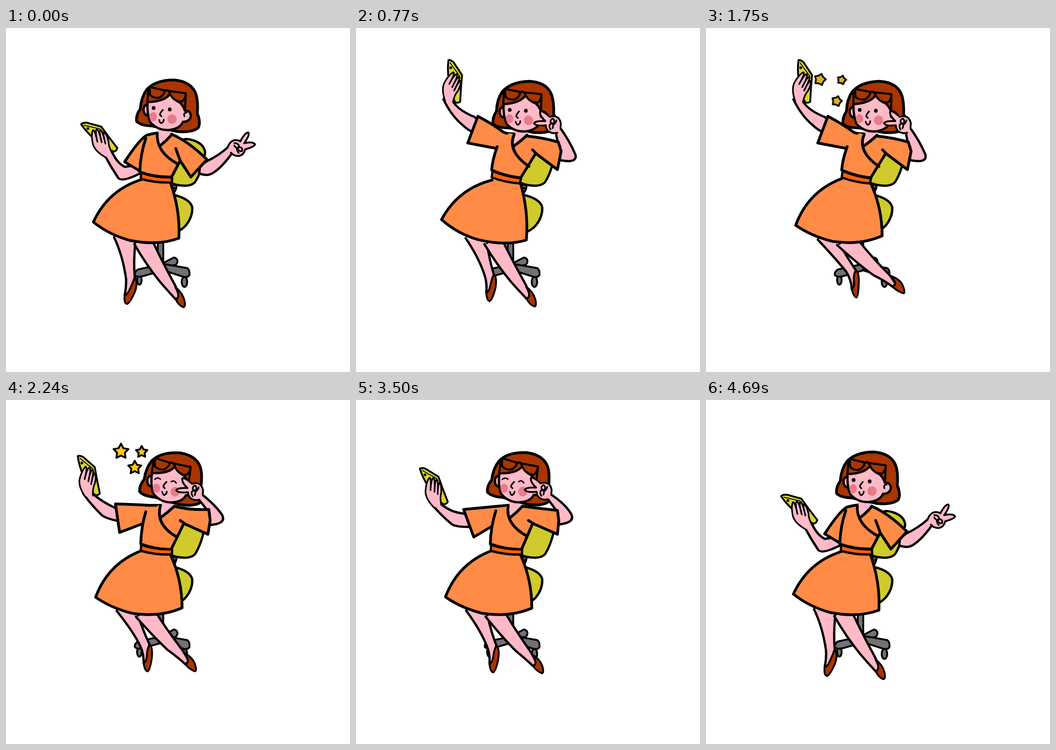
An HTML page with a canvas for the animation above (4760 ms loop, 748 by 748 pixels).

```html
<!DOCTYPE html>
<html lang="en">
<head>
<meta charset="utf-8">
<title>Selfie</title>
<style>
html, body { margin: 0; height: 100%; overflow: hidden; background: #fff; }
canvas { display: block; }
</style>
</head>
<body>
<canvas id="stage" width="748" height="748"></canvas>
<script>
const ctx = document.getElementById('stage').getContext('2d');
const LOOP = 4760, STEP = 70;
const SKIN = '#ffb9c7', HAIR = '#ab3500', DRESS = '#ff8b47', BELT = '#ff5f05',
      LIME = '#cfcb2c', GRAY = '#747074', BLUSH = '#e77c8b';

// Each list holds one shape in successive poses: lowered, raised, posing, lowering, lowered.
const cycle = list => [...list, list[0]];
const sleeveL = cycle([
  'M332 228Q316 230 306 233Q290 242 258 291L291 311L297 285',
  'M344 230Q326 230 320 226Q296 208 265 192L243 250L306 262',
  'M336 229Q320 229 310 229Q276 227 238 226L247 288L297 269',
  'M330 229Q318 230 308 231Q275 234 234 238L256 298L295 275']);
const armL = cycle([
  'M214 276Q228 302 244 326Q252 336 292 316L284 298L258 302Q240 292 230 268',
  'M190 155Q208 192 233 212Q241 220 256 228L270 203L257 193Q224 180 211 160',
  'M168 203Q180 222 206 248Q213 257 244 263L245 238L236 234Q210 222 190 205',
  'M167 229Q184 250 207 269Q214 276 246 276L244 249L234 247Q206 244 186 227']);
const phoneAt = cycle(['202 237 -26', '212 116 15', '178.5 164 0', '168 187 -9.5']);
const torso = cycle([
  'M304 240Q292 275 291 313Q325 325 360 324L378 290',
  'M307 258Q297 285 295 309Q325 322 358 326L390 274',
  'M304 243Q294 275 293 313Q325 325 359 325L387 268',
  'M304 241Q293 275 292 313Q325 325 360 325L384 269']);
const neck = cycle([
  'M331 215L331 232Q331 248 335 255L361 231L357 215Z',
  'M345 215L344 232Q340 250 342 257L371 233L368 215Z',
  'M339 215L337 232Q332 248 336 255L365 231L360 215Z',
  'M332 215L332 232Q331 248 335 255L362 231L358 215Z']);
const collar = cycle([
  'M329 229Q326 270 374 296M335 256Q350 244 361 231',
  'M344 231Q328 268 376 301M341 258Q356 248 372 233',
  'M336 229Q324 270 370 297M336 256Q352 244 366 231',
  'M331 229Q324 270 372 296M335 256Q350 244 362 231']);
const sleeveR = cycle([
  'M369 262L379 289L402 324L437 286L436 285Q396 246 360 231',
  'M384 265L394 275L438 308L446 268L440 248Q404 238 372 235',
  'M379 262L390 270L439 292L444 262L441 238Q400 240 366 231',
  'M375 262L388 270L438 292L441 262L438 240Q400 236 362 231']);
const beltLow = 'M294 315Q325 326 361 325L361 336Q325 337 293 328Z';
const belt = [beltLow, 'M297 311Q325 323 359 327L356 338Q325 336 295 325Z', beltLow, beltLow, beltLow];
const headAt = cycle(['0 0 0', '14 3.5 -2', '7 0 4', '2 0 3']);

// The waving arm passes through an upright pose on its way in and out.
const out = 'M491 273Q470 302 452 314Q438 324 420 316L422 300L436 290Q462 278 484 258';
const upright = 'M481 255Q470 288 455 310Q442 324 420 314L422 300L436 288Q458 268 468 248';
const armR = [out, upright,
  'M441 213Q464 244 477 275Q482 294 447 288L436 282L444 258Q436 245 435 227',
  'M427 206Q456 229 470 250Q480 270 440 272L436 262L443 247Q432 232 418 215',
  'M425 206Q456 227 468 248Q478 268 436 271L434 262L440 247Q430 232 416 214',
  upright, out];
const signAt = ['502 261 38', '485 240 0', '429 210 -85', '412 199 -85', '409 198 -85', '485 240 0', '502 261 38'];

const skirt = [
  'M296 329Q222 352 190 422Q225 450 270 462Q330 474 376 457Q379 395 357 335',
  'M296 327Q222 355 195 429Q230 453 275 464Q335 473 383 452Q383 390 357 335'];
const legL = [
  'M235 455Q254 495 261 545Q262 560 258 582L272 575Q274 556 280 543Q277 510 281 468',
  'M243 460Q285 505 305 530Q316 548 317 568L322 563Q320 540 326 527Q308 500 290 470'];
const shoeL = [
  'M281 543Q287 552 281 572Q270 598 263 600Q256 598 258 582Q264 580 270 566Q276 552 281 543Z',
  'M326 527Q334 532 332 560Q331 584 327 586Q321 584 317 568Q323 565 322 550Q320 535 326 527Z'];
const legR = [
  'M279 470Q305 515 335 552Q352 572 369 590L378 585Q372 570 368 560Q338 505 320 466',
  'M285 472Q335 517 365 538Q390 550 406 563L412 556Q406 546 400 538Q362 500 335 466'];
const shoeR = [
  'M368 563Q384 576 388 592Q391 606 386 607Q376 604 369 590Q376 588 374 576Q371 568 368 563Z',
  'M399 538Q420 545 427 558Q434 574 430 577Q418 574 406 563Q414 558 410 550Q405 544 399 538Z'];

// Timelines: [ms, value]
const bodyKeys = [[0, 0], [650, 1], [1750, 1], [2240, 2], [2700, 2.5], [3360, 2.5], [3500, 3], [4130, 3.95], [4480, 4]];
const waveKeys = [[0, 0], [650, 2], [1750, 2], [2240, 3], [2700, 3.5], [3360, 3.5], [3500, 4], [3620, 4.03], [4130, 5], [4620, 6]];
const legLKeys = [[0, 0], [770, .43], [1750, 1], [2240, .7], [2700, .57], [3430, .57], [3500, .55], [4130, .14], [4620, 0]];
const legRKeys = [[0, 0], [770, .05], [1750, 1], [2240, .57], [2700, .45], [3430, .45], [3500, .43], [4130, .02], [4480, 0]];
const skirtKeys = [[0, 0], [770, -.8], [1750, 1], [3500, .9], [4130, 0]];
const starKeys = [[1610, 0], [1750, .45], [2030, 1], [2520, 1], [2800, 0]];

function track(keys, t) {
  const i = keys.findIndex(k => k[0] > t);
  if (i < 0) return keys[keys.length - 1][1];
  if (!i) return keys[0][1];
  const [t0, a] = keys[i - 1], [t1, b] = keys[i], u = (t - t0) / (t1 - t0);
  return a + (b - a) * u * u * (3 - 2 * u);
}

function mix(poses, x) {
  const i = Math.max(0, Math.min(Math.floor(x), poses.length - 2));
  const next = poses[i + 1].match(/-?[\d.]+/g);
  let n = 0;
  return poses[i].replace(/-?[\d.]+/g, v => (+v + (next[n++] - v) * (x - i)).toFixed(2));
}

function draw(path, fill, width = 5) {
  const p = new Path2D(path);
  if (fill) { ctx.fillStyle = fill; ctx.fill(p); }
  if (width) { ctx.lineWidth = width; ctx.stroke(p); }
}

function oval(x, y, rx, ry, fill, width = 0) {
  ctx.beginPath();
  ctx.ellipse(x, y, rx, ry, 0, 0, 7);
  ctx.fillStyle = fill;
  ctx.fill();
  if (width) { ctx.lineWidth = width; ctx.stroke(); }
}

// Runs paint with its pivot moved to (x, y) and turned.
function place(x, y, deg, px, py, paint) {
  ctx.save();
  ctx.translate(x, y);
  ctx.rotate(deg * Math.PI / 180);
  ctx.translate(-px, -py);
  paint();
  ctx.restore();
}

const numbers = text => text.split(' ').map(Number);

function chair() {
  draw('M350 330Q362 270 378 246Q390 238 406 244Q432 252 433 272Q426 310 413 332Q408 342 390 343Q372 343 356 336Z', LIME);
  draw('M355 340L371 342Q371 352 364 360L355 360ZM358 347L370 349', GRAY, 4);
  draw('M350 360Q400 368 405 390Q406 410 392 428Q384 438 370 444Z', LIME);
  oval(290, 548, 5, 10, GRAY, 4);
  oval(388, 552, 6, 11, GRAY, 4);
  draw('M340 512L365 499Q372 500 373 507Q372 514 368 515L345 520Z', GRAY, 4);
  draw('M330 460L330 514L342 514L342 460Z', GRAY, 4);
  draw('M338 514L287 525Q279 530 280 537Q284 543 300 539L345 526Z', GRAY, 4);
  draw('M342 513L394 522Q400 526 399 537Q396 543 386 541L342 527Z', GRAY, 4);
}

function phoneHand() {
  draw('M156 122Q160 120 168 124L193 146Q198 176 204 203Q200 208 194 207Q176 190 168 165Q158 140 156 122Z', '#d8d52f', 4);
  draw('M161 127L188 149', null, 2);
  oval(165, 137, 3, 3, '#000');
  draw('M172 210Q157 188 160 172Q165 152 173 145Q178 144 171 172Q176 150 181 147Q186 148 179 177Q183 155 188 151' +
       'Q192 152 185 183Q189 162 193 159Q197 164 193 182Q188 192 189 208', SKIN, 3.5);
}

function signHand() {
  draw('M468 250Q464 238 470 230Q476 224 482 224Q478 202 484 198Q490 200 491 222Q502 208 511 209Q514 214 501 231' +
       'Q506 242 500 250Q492 258 481 256', SKIN, 4);
  draw('M474 235Q484 228 488 237Q484 242 477 239M486 236Q494 230 498 238Q494 244 487 240M484 240Q490 246 495 246', null, 3.5);
}

function head(closed) {
  draw('M318 213Q292 212 284 203Q282 190 292 176Q294 150 306 134Q325 113 366 113Q406 117 414 147Q418 165 416 186' +
       'Q424 205 418 217Q405 228 372 225Z', HAIR, 6);
  draw('M308 167Q299 167 299 178Q300 190 309 190', SKIN);
  draw('M308 160Q306 185 313 204Q328 222 352 222Q378 220 385 204Q400 204 402 191Q400 178 389 180Q386 170 378 162' +
       'Q364 156 357 143Q345 160 308 161Z', SKIN);
  oval(320, 193, 8, 10, BLUSH);
  oval(361, 198, 10, 10.5, BLUSH);
  draw('M393 184Q385 184 388 192', null, 3.5);
  draw('M341 178Q333 187 335 189L338 192', null, 3.5);
  draw('M333 200Q335 207 338 207Q343 204 343 199', null, 3.5);
  if (closed) draw('M315 174Q321 168 327 173M351 177Q357 172 362 179', null, 3);
  else {
    oval(321, 174, 4, 4.2, '#000');
    oval(356, 177, 4, 4.2, '#000');
  }
  draw('M312 128L346 136Q342 149 331 152Q318 152 313 145Z', HAIR, 4.5);
  draw('M354 137L391 142Q390 156 382 160Q362 160 354 137Z', HAIR, 4.5);
  draw('M344 137Q350 133 356 139M310 130L307 166M391 146L389 178', null, 4.5);
}

function star(x, y, size, grow) {
  const late = 1 - grow;
  ctx.beginPath();
  for (let i = 0; i < 10; i++) {
    const r = size * (i % 2 ? .52 + .3 * late : 1) * (1 - .45 * late);
    const a = (i / 5 - .5) * Math.PI + late * .5;
    ctx.lineTo(x + r * Math.cos(a), y + r * Math.sin(a));
  }
  ctx.closePath();
  ctx.globalAlpha = Math.min(1, grow * 2);
  ctx.fillStyle = `rgb(${190 + 65 * grow},${140 + 60 * grow},15)`;
  ctx.fill();
  ctx.lineWidth = 4;
  ctx.stroke();
  ctx.globalAlpha = 1;
}

function render(t) {
  const body = track(bodyKeys, t), wave = track(waveKeys, t);
  const left = track(legLKeys, t), right = track(legRKeys, t), grow = track(starKeys, t);
  const [hx, hy, tilt] = numbers(mix(headAt, body));

  ctx.fillStyle = '#fff';
  ctx.fillRect(0, 0, 748, 748);
  ctx.lineCap = ctx.lineJoin = 'round';
  ctx.strokeStyle = '#000';

  chair();
  draw(mix(legL, left), SKIN);
  draw(mix(shoeL, left), HAIR, 4);
  draw(mix(legR, right), SKIN);
  draw(mix(shoeR, right), HAIR, 4);
  draw(mix(skirt, track(skirtKeys, t)), DRESS, 6);

  draw(mix(armL, body), SKIN);
  place(...numbers(mix(phoneAt, body)), 178.5, 164, phoneHand);
  draw(mix(sleeveL, body), DRESS, 6);

  const trunk = mix(torso, body);
  draw(trunk + 'L375 233L332 229Z', DRESS, 0);
  draw(trunk, null, 6);
  draw(mix(neck, body), SKIN, 0);
  draw(mix(collar, body), null, 6);
  draw(mix(belt, body), BELT);

  place(340 + hx, 195 + hy, tilt, 340, 195, () => head(t >= 2030 && t < 3850));
  draw(mix(armR, wave), SKIN);
  place(...numbers(mix(signAt, wave)), 485, 240, signHand);
  draw(mix(sleeveR, body), DRESS, 6);

  if (grow > 0) {
    star(250 - 4 * (1 - grow), 112, 17, grow);
    star(295, 113, 13, grow);
    star(280 + 8 * (1 - grow), 147 + 22 * (1 - grow), 15, grow);
  }
}

function tick() {
  render(Math.floor(performance.now() % LOOP / STEP) * STEP);
  requestAnimationFrame(tick);
}
tick();
</script>
</body>
</html>
```
